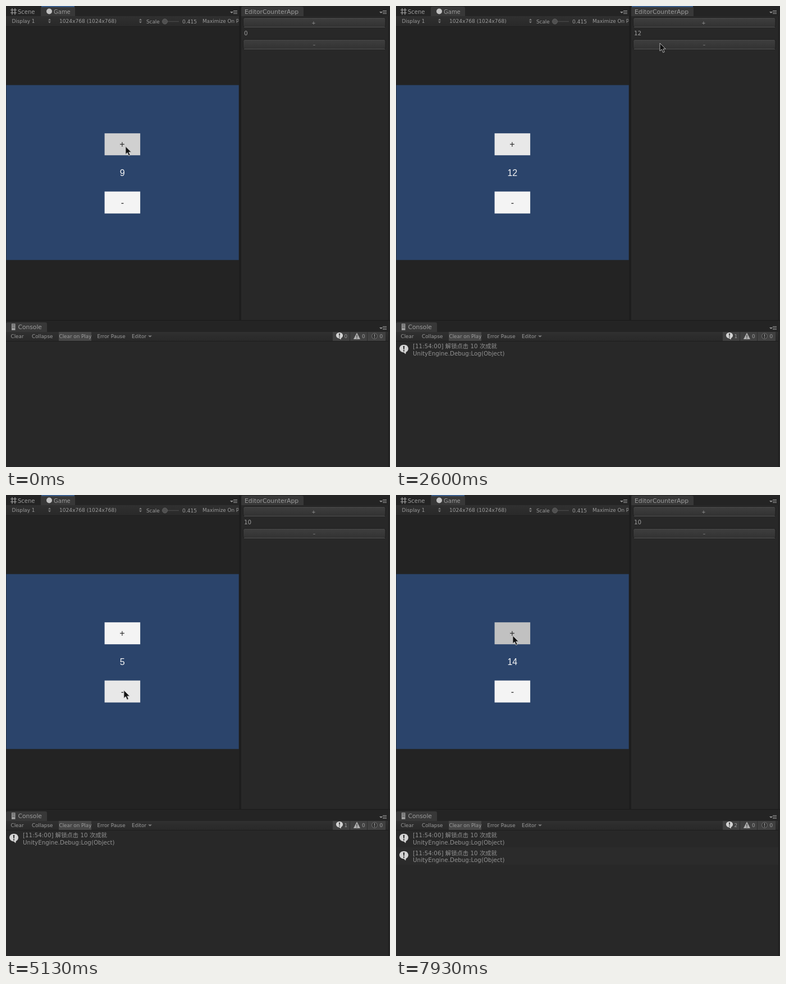
These frames come from a looping animation (684 by 819 pixels, 8000 ms). An HTML page:

```html
<!DOCTYPE html>
<html lang="en">
<head>
<meta charset="utf-8">
<title>Counter</title>
<style>
html, body { margin: 0; width: 684px; height: 819px; overflow: hidden; background: #282828; }
svg { display: block; }
text { font-family: "DejaVu Sans", "Noto Sans CJK SC", "Noto Sans CJK", sans-serif; fill: #9c9c9c; white-space: pre; }
.tab { font-size: 10.4px; }
.bar { font-size: 8.8px; }
.log { font-size: 10.35px; fill: #929292; }
.ui { font: 16px "Liberation Sans", Arial, sans-serif; text-anchor: middle; fill: #2b2b2b; }
.count { fill: #f4f4f4; }
.mid { text-anchor: middle; }
</style>
</head>
<body>
<svg width="684" height="819" viewBox="0 0 684 819">
  <defs>
    <linearGradient id="btn" x2="0" y2="1">
      <stop stop-color="#3f3f3f"/><stop offset="1" stop-color="#323232"/>
    </linearGradient>
    <linearGradient id="btnDown" x2="0" y2="1">
      <stop stop-color="#343434"/><stop offset="1" stop-color="#464146"/>
    </linearGradient>
    <linearGradient id="bar" x2="0" y2="1">
      <stop stop-color="#303030"/><stop offset="1" stop-color="#292929"/>
    </linearGradient>
    <clipPath id="view"><path d="M0 0H414.500V40H0Z"/></clipPath>
    <g id="menu">
      <path d="M0 2H6L3 5Z" fill="#959595"/>
      <path d="M6 .5H13M6 3H13M6 5.500H13" stroke="#959595"/>
    </g>
    <path id="updown" d="M0 3L2.500 0L5 3ZM0 5L2.500 8L5 5Z" fill="#808080"/>
    <g id="bubble">
      <path d="M-8 -1A8 7 0 1 1 4 5.200L3 9L0 6A8 7 0 0 1 -8 -1Z" fill="#d2d2d2"/>
      <path d="M-1.200 -5.500H1.200L.7 .8H-.7ZM-1 2H1V4H-1Z" fill="#222"/>
    </g>
  </defs>

  <!-- game panel -->
  <path d="M0 0H684V18H0Z" fill="#242424"/>
  <path d="M62 18V4Q62 1 65 1H120Q123 1 123 4V18Z" fill="#383838"/>
  <path id="gameFocus" d="M63 1H122" stroke="#3b69a4" stroke-width="1.600"/>
  <path d="M8 7H19M8 12H19M11 4V15.500M16 4V15.500" stroke="#a8a8a8" stroke-width="1.200"/>
  <text class="tab" x="21" y="13.500" style="font-size:10px">Scene</text>
  <circle cx="77" cy="9.500" r="5" fill="#c2c2c2"/>
  <text class="tab" x="85" y="13.500" style="font-size:10px">Game</text>
  <use href="#menu" x="399" y="8"/>
  <path d="M0 18H415V36H0Z" fill="url(#bar)"/>
  <g class="bar" clip-path="url(#view)">
    <text x="10.500" y="29.500">Display 1</text>
    <text x="95" y="29.500" style="font-size:9.100px">1024x768 (1024x768)</text>
    <text x="250" y="30.500">Scale</text>
    <text x="314" y="30.500" style="font-size:9.100px">0.415</text>
    <text x="350" y="29.500">Maximize On Play</text>
  </g>
  <use href="#updown" x="75" y="22.500"/>
  <use href="#updown" x="237" y="22.500"/>
  <path d="M286 27.500H308" stroke="#464646" stroke-width="1.500"/>
  <circle cx="283" cy="27.500" r="4.500" fill="#505050" stroke="#606060"/>
  <path d="M0 36H415V558H0Z" fill="#232323"/>
  <path d="M0 36.500H415" stroke="#1e1e1e"/>
  <path d="M.5 140.500H414.700V451.300H.5Z" fill="#2b446b"/>
  <rect id="plus" x="175.600" y="226.200" width="63.500" height="39"/>
  <rect id="minus" x="175.600" y="329.600" width="63.500" height="39"/>
  <text class="ui" x="207" y="251">+</text>
  <text class="ui" x="207.300" y="355">-</text>
  <text class="ui count" id="count" x="207.300" y="302"></text>

  <!-- editor panel -->
  <path d="M415 0H419V558H415Z" fill="#1e1e1e"/>
  <path d="M419 18H681V558H419Z" fill="#282828"/>
  <path d="M419 18V4Q419 1 422 1H527Q530 1 530 4V18Z" fill="#383838"/>
  <path id="editFocus" d="M420 1H529" stroke="#3b69a4" stroke-width="1.600"/>
  <text class="tab" x="425" y="13.500" style="font-size:10.800px">EditorCounterApp</text>
  <use href="#menu" x="665" y="8"/>
  <g stroke="#1d1d1d">
    <rect id="editPlus" x="422.500" y="20.500" width="253.500" height="17" rx="3"/>
    <rect id="editMinus" x="422.500" y="59.500" width="253.500" height="17" rx="3"/>
  </g>
  <path d="M425 21.500H674M425 60.500H674" stroke="#484848"/>
  <path d="M424 37.500H675M424 76.500H675" stroke="#505050"/>
  <text class="bar mid" x="548" y="32.500">+</text>
  <text class="bar mid" x="549" y="71.500">–</text>
  <text id="label" x="424" y="51.700" style="font-size:10.400px"></text>
  <path d="M681.500 18V819" stroke="#1c1c1c"/>

  <!-- console -->
  <path d="M0 558H684V579H0Z" fill="#242424"/>
  <path d="M0 558.500H684" stroke="#1a1a1a"/>
  <path d="M0 579V565Q0 562 3 562H70Q73 562 73 565V579Z" fill="#383838"/>
  <path d="M10 564.500H16.500V576H10Z" fill="#a0a0a0"/>
  <path d="M11 566.500H15.500M11 569H15.500M11 571.500H15.500" stroke="#444"/>
  <text class="tab" x="21.500" y="574.300" style="font-size:10.700px">Console</text>
  <use href="#menu" x="665" y="569"/>
  <path d="M0 579H681V595H0Z" fill="url(#bar)"/>
  <path d="M94 579H152V595H94Z" fill="#474747"/>
  <path d="M582 579H612V595H582ZM613 579H643V595H613ZM644 579H676V595H644Z" fill="#404040"/>
  <path d="M0 595.500H681" stroke="#1d1d1d"/>
  <g class="bar">
    <text x="8.500" y="590">Clear</text>
    <text x="46" y="590">Collapse</text>
    <text x="94.500" y="590">Clear on Play</text>
    <text x="162.500" y="590">Error Pause</text>
    <text x="224" y="590">Editor</text>
    <text id="infos" x="602.500" y="590"></text>
    <text x="634" y="590">0</text>
    <text x="665.500" y="590">0</text>
  </g>
  <path d="M253 585.500H260L256.500 588.500Z" fill="#808080"/>
  <use href="#bubble" transform="translate(594 586) scale(.76)"/>
  <path d="M625 580.500L631 592H619Z" fill="#b0b0b0"/>
  <path d="M624.400 584.500H625.600V588.500H624.400ZM624.400 589.500H625.600V591H624.400Z" fill="#333"/>
  <circle cx="656.500" cy="586.500" r="5" fill="#343434" stroke="#707070"/>
  <path d="M656 583H657V587.500H656ZM656 588.500H657V590H656Z" fill="#aaa"/>
  <g id="log1">
    <use href="#bubble" x="14" y="609.500"/>
    <text class="log" x="30" y="608.300">[11:54:00] 解锁点击 10 次成就</text>
    <text class="log" x="30" y="621">UnityEngine.Debug:Log(Object)</text>
  </g>
  <g id="log2">
    <path d="M0 626H681V657H0Z" fill="#2b2b2b"/>
    <use href="#bubble" x="14" y="640.500"/>
    <text class="log" x="30" y="639.500">[11:54:06] 解锁点击 10 次成就</text>
    <text class="log" x="30" y="652.300">UnityEngine.Debug:Log(Object)</text>
  </g>

  <path id="cursor" d="M0 0V14L3.300 11L5.700 16.600L8.200 15.500L5.800 10.200H10.200Z" fill="#111" stroke="#c4c4c4" stroke-width=".9"/>
</svg>
<script>
const LOOP = 8000;
const NORMAL = 244, HOVER = 232, PRESSED = 184, FADE = 100;

// release times of each click
const clicks = {
  plus: [-48, 200, 5950, 6150, 6350, 6550, 6750, 6950, 7160, 7400, 7640, 8000],
  minus: [4130, 4340, 4550, 4760, 4970],
  editPlus: [1090, 1290, 1490, 1700, 1945],
  editMinus: [2330, 2470, 2600, 2800, 2930]
};
const hold = { plus: 150, minus: 110, editPlus: 80, editMinus: 65 };

// time, x, y of the pointer tip
const path = [
  [0, 213, 249.500], [300, 213, 249.500], [870, 460, 32], [1980, 460, 32], [2230, 470, 66],
  [2950, 470, 66], [3130, 232, 289], [3250, 232, 289], [3380, 215, 239],
  [3420, 215, 239], [3700, 210, 347], [5170, 210, 347], [5500, 208, 250], [LOOP, 208, 250]
];

const el = {};
document.querySelectorAll("svg [id]").forEach(n => el[n.id] = n);

const pressEvents = id => clicks[id].flatMap(t => [[t - hold[id], PRESSED], [t, HOVER]]);
const byTime = (a, b) => a[0] - b[0];
const shades = {
  plus: [...pressEvents("plus"), [4020, NORMAL], [5420, HOVER]].sort(byTime),
  minus: [...pressEvents("minus"), [3620, HOVER], [5800, NORMAL]].sort(byTime)
};

function shade(id, t) {
  let from = id === "plus" ? HOVER : NORMAL, to = from, start = -1000;
  const at = now => from + (to - from) * Math.min(1, (now - start) / FADE);
  for (const [time, target] of shades[id]) {
    if (time > t) break;
    from = at(time);
    to = target;
    start = time;
  }
  return Math.round(at(t));
}

const done = (id, t) => clicks[id].filter(c => c <= t).length;
const value = t => 8 + done("plus", t) + done("editPlus", t) - done("minus", t) - done("editMinus", t);
const isDown = (id, t) => clicks[id].some(c => t >= c - hold[id] && t < c);
const show = (node, on) => node.style.display = on ? "" : "none";

function pointer(t) {
  const i = path.findIndex(p => p[0] > t);
  const [t0, x0, y0] = path[i - 1], [t1, x1, y1] = path[i];
  const k = (t - t0) / (t1 - t0), e = k * k * (3 - 2 * k);
  return [x0 + (x1 - x0) * e, y0 + (y1 - y0) * e];
}

function draw(now) {
  const t = now % LOOP;
  for (const id of ["plus", "minus"]) {
    const v = shade(id, t);
    el[id].setAttribute("fill", `rgb(${v},${v},${v})`);
  }
  for (const id of ["editPlus", "editMinus"])
    el[id].setAttribute("fill", isDown(id, t) ? "url(#btnDown)" : "url(#btn)");
  el.count.textContent = value(t);
  el.label.textContent = t < 820 ? 0 : value(Math.min(t, 3100));
  const editing = t >= 1010 && t < 4020;
  show(el.gameFocus, !editing);
  show(el.editFocus, editing);
  const logs = (t >= 200) + (t >= 6750);
  el.infos.textContent = logs;
  show(el.log1, logs > 0);
  show(el.log2, logs > 1);
  el.cursor.setAttribute("transform", `translate(${pointer(t)})`);
  requestAnimationFrame(draw);
}
draw(0);
</script>
</body>
</html>
```
